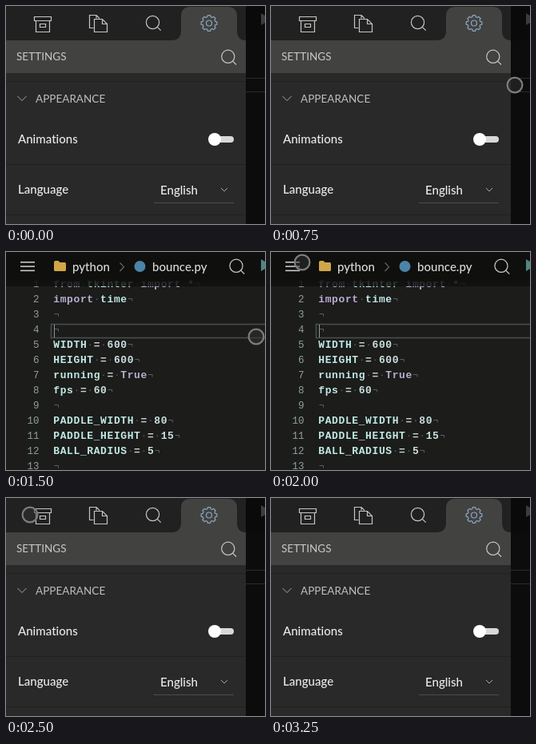
An HTML page with a canvas for the animation above (4000 ms loop, 324x273 px).

```html
<!DOCTYPE html>
<html lang="en">
<head>
<meta charset="utf-8">
<title>Settings panel</title>
<style>
html, body { margin: 0; width: 100%; height: 100%; overflow: hidden; background: #1c1c1b; }
canvas { display: block; width: 324px; height: 273px; }
</style>
</head>
<body>
<canvas id="stage"></canvas>
<script>
const W = 324, H = 273, LOOP = 4000, STEP = 250;
const canvas = document.getElementById('stage');
const ctx = canvas.getContext('2d');
const ratio = window.devicePixelRatio || 1;
canvas.width = W * ratio;
canvas.height = H * ratio;
ctx.scale(ratio, ratio);
ctx.letterSpacing = '0.02px'; // any spacing turns ligatures off

const UI = 'Lato, sans-serif';
const LABEL = '500 15px ' + UI;
const HEADING = '13.5px ' + UI;
const MONO = '"Liberation Mono", monospace';
const CHAR = 8.4;

// Pointer position for each tick while it is visible
const FIRST_TICK = 3;
const POINTER = [[305, 99], [312, 103], [313, 106], [313, 106], [176, 58], [39, 13], [29.5, 21], [30, 21]];

const CODE = [
  [['from', 'key'], [' tkinter ', 'name'], ['import', 'key'], [' *', 'op']],
  [['import', 'key'], [' time', 'name']],
  [],
  [],
  [['WIDTH', 'name'], [' = ', 'op'], ['600', 'num']],
  [['HEIGHT', 'name'], [' = ', 'op'], ['600', 'num']],
  [['running', 'name'], [' = ', 'op'], ['True', 'key']],
  [['fps', 'name'], [' = ', 'op'], ['60', 'num']],
  [],
  [['PADDLE_WIDTH', 'name'], [' = ', 'op'], ['80', 'num']],
  [['PADDLE_HEIGHT', 'name'], [' = ', 'op'], ['15', 'num']],
  [['BALL_RADIUS', 'name'], [' = ', 'op'], ['5', 'num']],
  []
];
const INK = { key: '#b9aed0', name: '#bfe9e4', op: '#c9d3d1', num: '#c9dfe0' };

function rect(x, y, w, h, color) {
  ctx.fillStyle = color;
  ctx.fillRect(x, y, w, h);
}

function text(str, x, y, font, color, align = 'left') {
  ctx.font = font;
  ctx.fillStyle = color;
  ctx.textAlign = align;
  ctx.fillText(str, x, y);
}

function stroke(path, color, width = 1.2) {
  ctx.strokeStyle = color;
  ctx.lineWidth = width;
  ctx.stroke(new Path2D(path));
}

function fill(path, color) {
  ctx.fillStyle = color;
  ctx.fill(new Path2D(path));
}

function circle(x, y, r, color, width) {
  ctx.beginPath();
  ctx.arc(x, y, r, 0, Math.PI * 2);
  if (width) {
    ctx.strokeStyle = color;
    ctx.lineWidth = width;
    ctx.stroke();
  } else {
    ctx.fillStyle = color;
    ctx.fill();
  }
}

function lens(x, y, color) {
  circle(x, y, 8.1, color, 1.2);
  stroke(`M${x + 5.8} ${y + 5.8}l4.4 4.4`, color);
}

function gear(x, y, color) {
  const teeth = 8;
  ctx.beginPath();
  for (let i = 0; i < teeth; i++) {
    const a = i * Math.PI * 2 / teeth - Math.PI / 2;
    for (const [da, r] of [[-0.26, 8.1], [-0.17, 10], [0.17, 10], [0.26, 8.1]]) {
      ctx.lineTo(x + r * Math.cos(a + da), y + r * Math.sin(a + da));
    }
  }
  ctx.closePath();
  ctx.lineJoin = 'round';
  ctx.strokeStyle = color;
  ctx.lineWidth = 1.2;
  ctx.stroke();
  ctx.lineJoin = 'miter';
  circle(x, y, 3.5, color, 1.2);
}

function drawPanel() {
  const line = '#c5c5c3', bar = '#424241';
  rect(0, 0, W, H, '#0d0c0c');
  rect(300, 0, 24, 43, '#0a0a0a');
  fill('M319 9L324 12V21L319 24Z', '#3b3b3b');
  rect(300, 90, 24, 1, '#2b2b2d');
  rect(300, 107, 24, 1, '#2b2b2d');

  rect(0, 0, 300, H, '#2a2929');
  rect(0, 0, 300, 43, '#222121');
  fill('M207 43Q219 43 219 31V13Q219 1 231 1H277Q289 1 289 13V31Q289 43 300 43Z', bar);
  rect(0, 43, 300, 41, bar);
  for (const y of [94, 198, 261]) rect(0, y, 300, 1, '#20201f');

  stroke('M35.5 13.5H56.5V18.5H35.5ZM37.5 18.5V32.5H54.5V18.5M42.5 22.5H49.5V26.5H42.5Z', line);
  stroke('M109.5 27.5H104.5V11.5H113L117 15.5M113 11.5V15.5', line);
  stroke('M110.5 16.5H120.5L126.5 22.5V32.5H110.5ZM120.5 16.5V22.5H126.5', line);
  lens(183.5, 20.5, line);
  gear(254, 21.5, '#8aa6bf');

  text('SETTINGS', 13, 68, HEADING, '#c8c8c6');
  lens(277.8, 63.3, line);
  stroke('M14.5 113L20 118.5L25.5 113', '#a8a8a6', 1);
  text('APPEARANCE', 37, 121, HEADING, '#bebebc');

  text('Animations', 15, 172, LABEL, '#ececea');
  ctx.lineCap = 'round';
  stroke('M261 167H281', '#d8d8d6', 8);
  ctx.lineCap = 'butt';
  circle(261, 167, 8, '#ffffff');

  text('Language', 15, 235, LABEL, '#ececea');
  text('English', 193, 236, LABEL, '#ececea');
  stroke('M269 228L273 232L277 228', '#a9a9a7', 1);
  rect(185, 246, 100, 1, '#4d4d4c');
}

function codeLine(parts, row) {
  const y = 44 + row * 19;
  let x = 59;
  text(String(row + 1), 41.5, y, '12.5px ' + MONO, '#8d9f9f', 'right');
  for (const [str, kind] of parts) {
    for (const ch of str) {
      if (ch === ' ') rect(x + 3.5, y - 4.5, 1.5, 1.5, '#5a5f5e');
      else text(ch, x + 0.3, y, 'bold 13px ' + MONO, INK[kind]);
      x += CHAR;
    }
  }
  stroke(`M${x + 1.5} ${y - 4.5}h5v3`, '#5a5f5e', 1);
}

function drawEditor() {
  rect(0, 0, W, H, '#1c1c1b');
  ctx.strokeStyle = '#485052';
  ctx.lineWidth = 1.5;
  ctx.strokeRect(56.5, 90.5, 280, 17);
  CODE.forEach(codeLine);
  rect(60, 91, 1, 16, '#8c9898');

  // Toolbar that lets the first line shine through at its lower edge
  const shade = ctx.createLinearGradient(0, 34, 0, 44);
  shade.addColorStop(0, '#0f0f0e');
  shade.addColorStop(0.3, 'rgba(15,15,14,0.86)');
  shade.addColorStop(1, 'rgba(15,15,14,0.76)');
  rect(0, 0, W, 34, '#0f0f0e');
  rect(0, 34, W, 9, shade);

  for (const y of [12, 17.3, 22.6]) rect(18, y, 18, 1.5, '#d0d2d1');
  fill('M60 13Q60 11 62 11H65.5L67.5 13H73.5Q75 13 75 14.5V22.5Q75 24 73.5 24H61.5Q60 24 60 22.5Z', '#cfa748');
  text('python', 83, 24, LABEL, '#d9dcdb');
  stroke('M142.5 13.5L147.5 18.7L142.5 24', '#6b6e6d', 1.1);
  circle(167.5, 18, 7, '#4b84a8');
  text('bounce.py', 183, 24, LABEL, '#d9dcdb');
  lens(288, 17.3, '#c9cbca');
  fill('M319 9L324 12V21L319 24Z', '#4f8584');
}

function drawPointer([x, y]) {
  circle(x, y, 9.4, 'rgba(50,50,50,0.5)');
  circle(x, y, 9.4, '#7c7c7b', 2.2);
}

function frame(now) {
  const tick = Math.floor((now % LOOP) / STEP);
  ctx.clearRect(0, 0, W, H);
  if (tick >= 6 && tick < 10) drawEditor();
  else drawPanel();
  const spot = POINTER[tick - FIRST_TICK];
  if (spot) drawPointer(spot);
  requestAnimationFrame(frame);
}
requestAnimationFrame(frame);
</script>
</body>
</html>
```
